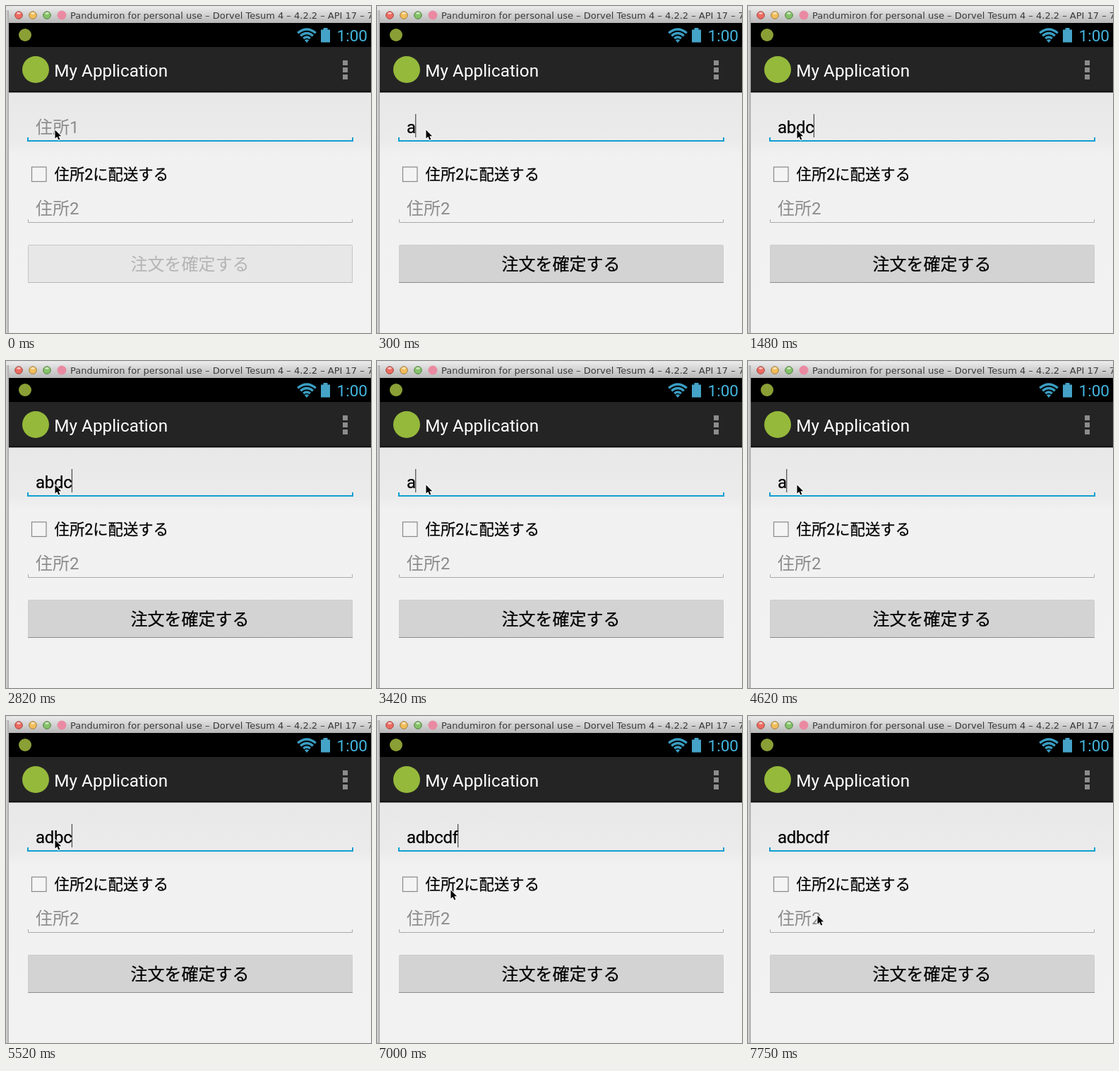
Animation of 517 by 463 pixels, one loop 8 s. Source, as an HTML page:

```html
<!DOCTYPE html>
<html lang="ja">
<head>
<meta charset="utf-8">
<title>Order form</title>
<style>
  html, body { margin: 0; width: 100%; height: 100%; overflow: hidden; background: #f1f1f1; }
  svg { display: block; width: 517px; height: 463px; }
  text { font-family: Roboto, "Noto Sans CJK JP", "Noto Sans CJK", sans-serif; white-space: pre; }
  .title { font: 13px "DejaVu Sans", sans-serif; fill: #3a3a3a; }
  .field { font-size: 24px; }
  .typed { letter-spacing: -.3px; }
  .hint { fill: #8b8b8b; }
  .ink { fill: #000; stroke: #000; stroke-width: .25; }
  .off { fill: #b4b4b4; }
</style>
</head>
<body>
<svg viewBox="0 0 517 463">
  <defs>
    <linearGradient id="chrome" x2="0" y2="1">
      <stop stop-color="#ebebeb"/><stop offset="1" stop-color="#b6b6b6"/>
    </linearGradient>
    <linearGradient id="page" x2="0" y2="1">
      <stop stop-color="#e8e8e8"/><stop offset=".2" stop-color="#ebebeb"/>
      <stop offset=".26" stop-color="#f1f1f1"/><stop offset="1" stop-color="#f2f2f2"/>
    </linearGradient>
    <linearGradient id="edge">
      <stop stop-color="#dadada"/><stop offset="1" stop-color="#a6a6a6"/>
    </linearGradient>
  </defs>

  <!-- window -->
  <rect width="517" height="463" fill="#e4e4e4"/>
  <rect y="6" width="4" height="457" fill="url(#edge)"/>
  <path d="M4 25V6q0-5 5-5H517V25z" fill="url(#chrome)"/>
  <g stroke-width="1">
    <circle cx="18" cy="13" r="5.3" fill="#ee6a60" stroke="#a04a44"/>
    <circle cx="38" cy="13" r="5.3" fill="#f2bd5a" stroke="#a17c3c"/>
    <circle cx="58" cy="13" r="5.3" fill="#85c268" stroke="#51803f"/>
  </g>
  <g fill="#fff" opacity=".6">
    <ellipse cx="18" cy="10.2" rx="2.8" ry="1.5"/>
    <ellipse cx="38" cy="10.2" rx="2.8" ry="1.5"/>
    <ellipse cx="58" cy="10.2" rx="2.8" ry="1.5"/>
  </g>
  <circle cx="79" cy="13" r="6.5" fill="#ea8aa2"/>
  <text class="title" x="91" y="17.5">Pandumiron for personal use – Dorvel Tesum 4 – 4.2.2 – API 17 – 7</text>

  <!-- status bar -->
  <rect x="4" y="24" width="513" height="34" fill="#000"/>
  <circle cx="27" cy="41" r="9" fill="#8a9f35"/>
  <g fill="none" stroke="#3a9dc2" stroke-width="3.4">
    <path d="M413.2 38.2q12.8-10.6 25.6 0"/>
    <path d="M417.2 42.2q8.8-7.2 17.6 0"/>
    <path d="M421.2 46q4.8-3.8 9.6 0"/>
  </g>
  <path d="M422.8 48.2q3.2-2 6.4 0L426 52z" fill="#3a9dc2"/>
  <path d="M446 33.5h3.5V31h6v2.5h3.5V51.5h-13z" fill="#45a3c8"/>
  <text x="468.6" y="50" font-size="22.5" fill="#43b6e0">1:00</text>

  <!-- action bar -->
  <rect x="4" y="58" width="513" height="65" fill="#242424"/>
  <rect x="4" y="120.5" width="513" height="2" fill="#0c0c0c"/>
  <circle cx="42" cy="90" r="19" fill="#95b93b"/>
  <text x="68.3" y="100" font-size="24.3" fill="#fff">My Application</text>
  <path d="M477 77h7v7h-7zM477 87h7v7h-7zM477 97h7v7h-7z" fill="#8c8c8c"/>

  <!-- form -->
  <rect x="4" y="122.5" width="513" height="340.5" fill="url(#page)"/>
  <path d="M31 186V191H491V186" fill="none" stroke="#109fd0" stroke-width="2"/>
  <text id="entry" x="42" y="179.5"></text>
  <rect id="caret" y="153" width="1.2" height="33" fill="#222"/>

  <rect x="36.5" y="228" width="20.5" height="20.5" fill="#f4f4f4" stroke="#898989" stroke-width="1.2"/>
  <text class="ink" x="68.6" y="246" font-size="21.35">住所2に配送する</text>

  <text class="field hint" x="42" y="295">住所2</text>
  <path d="M31.5 302V306.5H490.5V302" fill="none" stroke="#ababab"/>

  <rect id="button" x="31.5" y="338.5" width="459" height="53" rx="1"/>
  <path id="base" d="M31 391.5H491"/>
  <text id="label" x="260.5" y="374" text-anchor="middle">注文を確定する</text>

  <path id="pointer" d="M.5 1.5V13.5L3.4 10.9 5.4 15.6 7.4 14.7 5.4 10.2H9.2z"
        fill="#000" stroke="#fff" stroke-width="2" stroke-linejoin="round" paint-order="stroke"/>
</svg>
<script>
  const LOOP = 8000;
  const TYPING = [
    [0, ''], [300, 'a'], [740, 'ab'], [1040, 'abd'], [1480, 'abdc'], [1780, 'abdcf'],
    [2820, 'abdc'], [2970, 'abd'], [3270, 'ab'], [3420, 'a'], [3570, ''],
    [4620, 'a'], [4920, 'ad'], [5220, 'adb'], [5520, 'adbc'], [5820, 'adbcd'], [5960, 'adbcdf']
  ];
  const CARET = [
    [0, 0], [300, 1], [2230, 0], [2820, 1], [4170, 0], [4620, 1], [6560, 0], [7000, 1], [7450, 0]
  ];
  const POINTER = [
    [0, [69, 174]], [6560, [71, 180]], [6700, [82, 206]], [6850, [95, 232]], [7000, [104, 245]],
    [7150, [118, 252]], [7300, [131, 256]], [7450, [124, 257]], [7600, [109, 253]], [7750, [98, 281]]
  ];

  const $ = id => document.getElementById(id);
  const [entry, caret, button, base, label, pointer] =
    ['entry', 'caret', 'button', 'base', 'label', 'pointer'].map($);

  const at = (steps, t) => steps.findLast(step => step[0] <= t)[1];

  function set(el, attrs) {
    for (const name in attrs) el.setAttribute(name, attrs[name]);
  }

  function showText(text) {
    const on = text !== '';
    entry.textContent = text || '住所1';
    set(entry, { class: on ? 'field typed ink' : 'field hint' });
    set(caret, { x: 41.4 + (on ? entry.getComputedTextLength() : 0) });
    set(button, { fill: on ? '#d3d3d3' : '#e7e7e7', stroke: on ? '#cdcdcd' : '#c6c6c6' });
    set(base, { stroke: on ? '#8d8d8d' : '#b9b9b9' });
    set(label, { class: on ? 'field ink' : 'field off' });
  }

  const start = performance.now();

  function draw() {
    const t = (performance.now() - start) % LOOP;
    showText(at(TYPING, t));
    set(caret, { opacity: at(CARET, t) * 0.8 });
    set(pointer, { transform: `translate(${at(POINTER, t)})` });
    requestAnimationFrame(draw);
  }
  draw();
</script>
</body>
</html>
```
